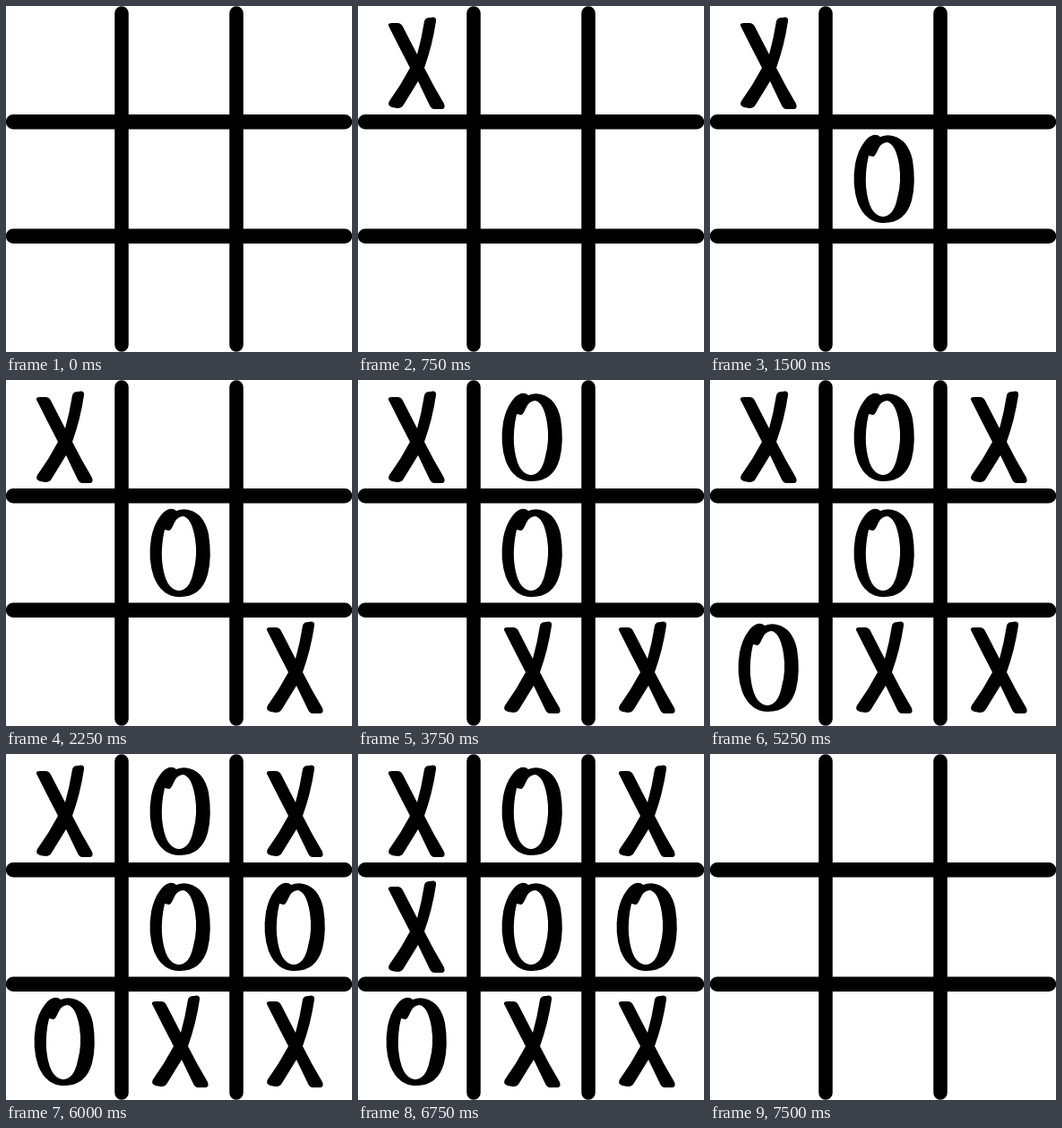
These frames come from a looping animation (386x386 px, 8000 ms). An HTML page with a canvas:

```html
<!DOCTYPE html>
<html lang="en">
<head>
<meta charset="utf-8">
<title>Noughts and crosses</title>
<style>
  html, body { margin: 0; width: 100%; height: 100%; overflow: hidden; background: #fff; }
  canvas { display: block; width: 100vw; height: 100vh; }
</style>
</head>
<body>
<canvas id="board" width="386" height="386"></canvas>
<script>
const ctx = document.getElementById("board").getContext("2d");
const SIZE = 386, PITCH = 128.5, LOOP = 8000, TURN = 750, CLEAR = 7500;

// Cells in playing order as [column, row]; crosses begin.
const moves = [[0, 0], [1, 1], [2, 2], [1, 0], [1, 2], [0, 2], [2, 0], [2, 1], [0, 1]];

// Both marks are outlined in the top-left cell.
const cross = new Path2D(
  "M34 22 Q33 19 38 19 L44 19 Q48 19 50 23 L66 54 " +
  "Q71 36 74 17 Q75 13 80 13 Q88 11 87 17 Q83 44 74 69 " +
  "Q84 89 96 109 Q98 115 93 115 L85 115 Q82 115 80 111 L67 84 " +
  "Q59 97 51 110 Q49 114 44 114 L38 113 Q32 111 35 106 Q48 88 58 69 " +
  "Q46 46 34 22 Z");
const nought = new Path2D(
  "M43 23 Q47 17 53 15 Q58 14 61 17 Q68 14 75 16 Q92 20 97 43 " +
  "Q101 68 96 88 Q89 113 65 113 Q45 113 36 91 Q29 71 33 47 Q36 32 43 23 Z " +
  "M48 38 Q44 55 45 72 Q48 104 63 106 Q76 106 80 85 Q85 68 82 48 " +
  "Q78 24 68 23 Q61 24 58 32 Q55 39 53 39 Z");

function drawLines(width, segments) {
  ctx.lineWidth = width;
  ctx.lineCap = "round";
  ctx.beginPath();
  for (const [x1, y1, x2, y2] of segments) {
    ctx.moveTo(x1, y1);
    ctx.lineTo(x2, y2);
  }
  ctx.stroke();
}

function drawGrid() {
  drawLines(15.5, [129, 257].map(x => [x, 8, x, SIZE - 8]));
  drawLines(16.5, [129.25, 256.75].map(y => [8, y, SIZE - 8, y]));
}

function drawMark(path, [col, row]) {
  ctx.save();
  ctx.translate(Math.round(col * PITCH), Math.round(row * PITCH));
  ctx.fill(path, "evenodd");
  ctx.restore();
}

function draw(time) {
  const t = time % LOOP;
  const played = t < CLEAR ? Math.floor(t / TURN) : 0;
  ctx.fillStyle = "#fff";
  ctx.fillRect(0, 0, SIZE, SIZE);
  ctx.fillStyle = ctx.strokeStyle = "#000";
  drawGrid();
  moves.slice(0, played).forEach((cell, i) => drawMark(i % 2 ? nought : cross, cell));
}

const start = performance.now();
function tick() {
  draw(performance.now() - start);
  requestAnimationFrame(tick);
}
tick();
</script>
</body>
</html>
```
